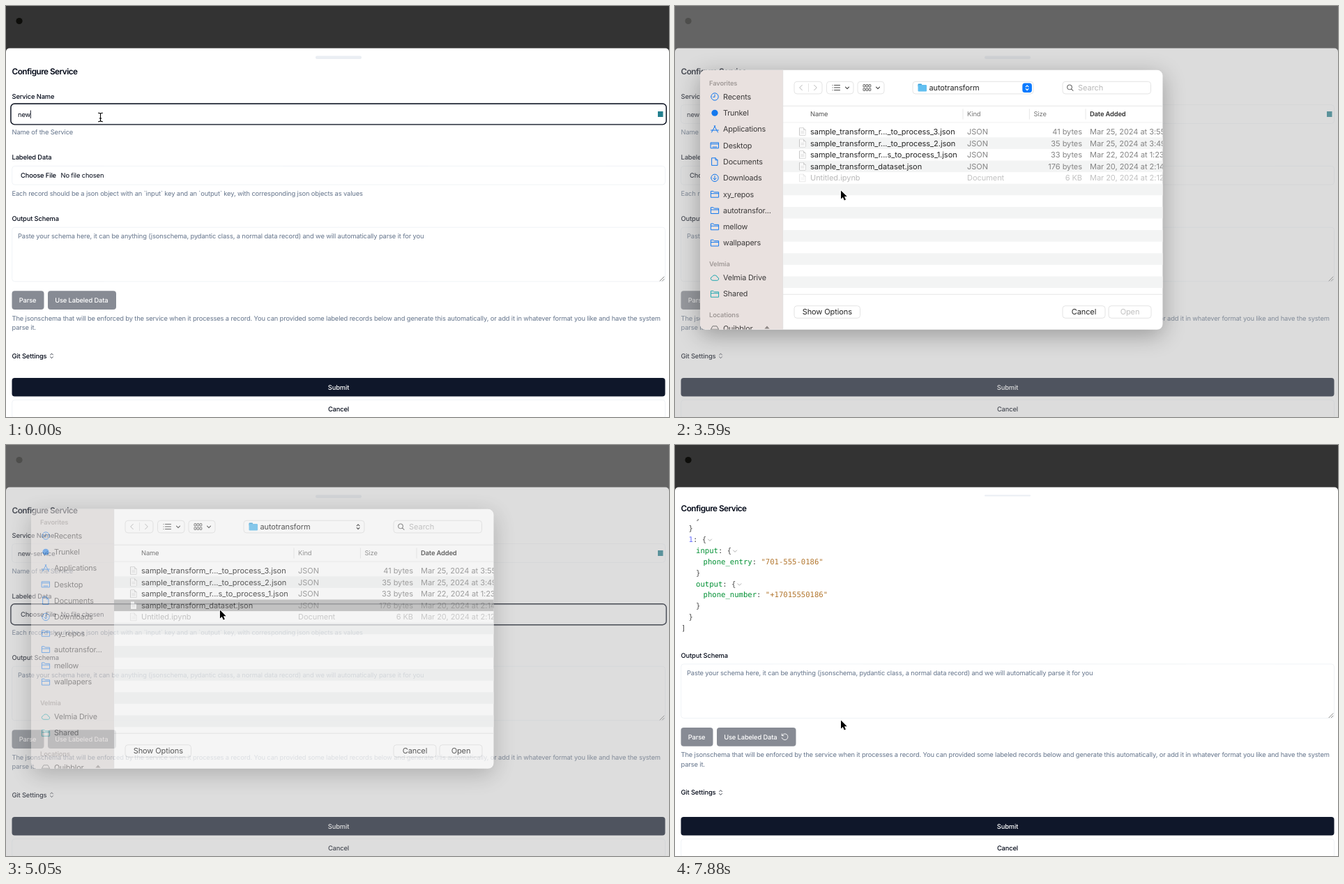
Animation of 951 by 589 pixels, one loop 8000 ms. Source, as an HTML page with a canvas:

```html
<!DOCTYPE html>
<html lang="en">
<head>
<meta charset="utf-8">
<title>Configure Service</title>
<style>
  html, body { margin: 0; width: 951px; height: 589px; overflow: hidden; background: #333; }
  canvas { display: block; width: 951px; height: 589px; }
</style>
</head>
<body>
<canvas id="stage"></canvas>
<script>
const W = 951, H = 589, LOOP = 8000;
const INK = '#020817', NAVY = '#0f172a', MUTED = '#64748b', BORDER = '#edf0f4', DISABLED = '#878b94';
const BLUE = '#1479ee', TEAL = '#20a8b0';
const ratio = window.devicePixelRatio || 1;

function layer(canvas) {
  canvas.width = W * ratio;
  canvas.height = H * ratio;
  const ctx = canvas.getContext('2d');
  ctx.scale(ratio, ratio);
  ctx.textRendering = 'geometricPrecision';
  return ctx;
}
const page = layer(document.getElementById('stage'));
const sheet = layer(document.createElement('canvas'));
let g = page;

const clamp = v => Math.max(0, Math.min(1, v));

// Piecewise linear track of [time, ...values]
function at(track, t) {
  const i = track.findIndex(p => p[0] > t);
  if (i === 0) return track[0].slice(1);
  if (i < 0) return track[track.length - 1].slice(1);
  const a = track[i - 1], b = track[i], u = (t - a[0]) / (b[0] - a[0]);
  return a.slice(1).map((v, k) => v + (b[k + 1] - v) * u);
}

// y is the middle of the capitals
function text(str, x, y, { color = INK, size = 9.34, weight = 400, align = 'left', gap = -0.13, font = 'Inter, sans-serif' } = {}) {
  g.font = `${weight} ${size}px ${font}`;
  g.letterSpacing = gap + 'px';
  g.textAlign = align;
  g.fillStyle = color;
  g.fillText(str, x, y + size * 0.36);
  return g.measureText(str).width;
}

function box(x, y, w, h, r, fill, stroke, lineWidth = 0.8) {
  g.beginPath();
  g.roundRect(x, y, w, h, r);
  if (fill) { g.fillStyle = fill; g.fill(); }
  if (stroke) { g.strokeStyle = stroke; g.lineWidth = lineWidth; g.stroke(); }
}

function icon(d, x, y, stroke, width = 1, fill) {
  g.save();
  g.translate(x, y);
  g.lineCap = g.lineJoin = 'round';
  const p = new Path2D(d);
  if (stroke) { g.strokeStyle = stroke; g.lineWidth = width; g.stroke(p); }
  if (fill) { g.fillStyle = fill; g.fill(p); }
  g.restore();
}

const ring = r => `M${-r} 0a${r} ${r} 0 1 0 ${2 * r} 0a${r} ${r} 0 1 0 ${-2 * r} 0`;
const ICONS = {
  clock: ring(5.2) + 'M0 -3V.4H-2.3',
  disc: ring(4.6),
  apps: 'M-4.5 4.5L.7 -5M4.5 4.5L-.7 -5M-5.5 1.5H5.5',
  desktop: 'M-5.5 -4h11v8h-11zM-5.5 -2h11M-3 2.2h6',
  page: 'M-4 -5.3H1L4 -2.3V5.3H-4zM1 -5.3V-2.3H4',
  download: ring(5.2) + 'M0 -2.8V2.6M-2.2 .5L0 2.7L2.2 .5',
  folder: 'M-5.6 4.2V-4.2h3.6l1.3 1.4h6.3V4.2zM-5.6 -.9h11.2',
  cloud: 'M-3.4 3.8a2.6 2.6 0 0 1-.3-5.1a4 4 0 0 1 7.5.8a2.2 2.2 0 0 1 .3 4.3z',
  drive: 'M-5.5 1L-3 -3.5H3L5.5 1V4h-11zM-5.5 1h11',
  down: 'M-2.5 -1.2L0 1.3L2.5 -1.2',
  upDown: 'M-1.9 -1.4L0 -3.3L1.9 -1.4M-1.9 1.4L0 3.3L1.9 1.4',
  copy: 'M-1.6 -4h4.2a1.2 1.2 0 0 1 1.2 1.2v2.6a1.2 1.2 0 0 1-1.2 1.2h-4.2a1.2 1.2 0 0 1-1.2-1.2v-2.6a1.2 1.2 0 0 1 1.2-1.2M-2.8 -1.4a1.2 1.2 0 0 0-1.2 1.2v3a1.2 1.2 0 0 0 1.2 1.2h3a1.2 1.2 0 0 0 1.2-1.2',
  redo: 'M-4.3 -4.4V-1.8H-1.7M-4.1 -2A4.4 4.4 0 1 1 -4.3 1.2',
  arrow: 'M0 0V12L2.8 9.5L4.8 14L6.9 13.1L4.9 8.7H8.7z',
  beam: 'M-3 -6.2Q0 -6.2 0 -4.5Q0 -6.2 3 -6.2M0 -4.5V4.5M-3 6.2Q0 6.2 0 4.5Q0 6.2 3 6.2M-1.4 1.5H1.4'
};

// ---- Form ----

const MONO = 10.6, CELL = MONO * 0.602, ROW = 15.93;
const tree = [[0, '', '[']];
[['202-555-0143', '+12025550143'], ['701-555-0186', '+17015550186']].forEach(([entry, number], i) => tree.push(
  [1, String(i), '{'],
  [2, 'input', '{'], [3, 'phone_entry', `"${entry}"`], [2, '', '}'],
  [2, 'output', '{'], [3, 'phone_number', `"${number}"`], [2, '', '}'],
  [1, '', '}']));
tree.push([0, '', ']']);

function drawTree(top, copies) {
  const mono = color => ({ color, size: MONO, gap: 0, font: '"DejaVu Sans Mono", monospace' });
  tree.forEach(([level, key, value], i) => {
    const y = top + i * ROW;
    let x = 9 + level * 10.5;
    if (key) {
      text(key, x, y, mono(level === 1 ? '#676dff' : '#009033'));
      text(':', x + key.length * CELL, y, mono('#4d4d4d'));
      x += (key.length + 2) * CELL;
    }
    text(value, x, y, mono(value[0] === '"' ? '#b2762e' : '#4d4d4d'));
    if (value === '{' || value === '[') {
      icon(ICONS.down, x + CELL + 5, y + 1.2, '#999', 0.8);
      if (i < copies) icon(ICONS.copy, x + CELL + 18.3, y + 0.8, '#555', 0.8);
    }
  });
}

function field(y, h, focused) {
  box(8.7, y, 936.8, h, 4, '#fff', BORDER);
  if (focused) box(6.9, y - 1.6, 940.3, h + 3.2, 5.5, null, INK, 1.4);
}

const label = (str, y) => text(str, 8.5, y, { weight: 500 });
const hint = (str, y, x = 8.5) => text(str, x, y, { color: MUTED });

function button(str, x, y, w, fill) {
  box(x, y, w, 26.8, 4, fill);
  text(str, x + 10.2, y + 13.6, { color: '#fff', weight: 500 });
}

function typedName(t) {
  const steps = [[0, 3], [150, 4], [450, 6], [600, 7], [1050, 8], [1350, 9], [1650, 11]];
  return 'new-service'.slice(0, steps.filter(s => s[0] <= t).pop()[1]);
}

function drawForm(t, tick) {
  const loaded = tick > 5300, loading = t >= 7280;
  const [scroll] = at([[5800, 0], [6401, 214.8], [6845, 326]], tick);
  const shift = loaded ? -2.4 : 0;

  g.fillStyle = '#333';
  g.fillRect(0, 0, W, H);
  icon(ICONS.disc, 19, 21.5, null, 1, '#0d0d0a');
  box(0, 60.5, W, 560, [5, 5, 0, 0], '#fff');
  box(444, 71.6, 66, loaded ? 2 : 4.4, 2, '#eaeef3');
  text('Configure Service', 8.5, 93.4 + shift, { size: 11.8, weight: 600, gap: -0.54 });

  g.save();
  g.beginPath();
  g.rect(0, 106, W, 416);
  g.clip();
  g.translate(0, shift - scroll);

  label('Service Name', 129.3);
  field(141.6, 26.7, t < 1950);
  const end = 17 + text(typedName(t), 17, 155.3);
  if (t < 1950) { g.fillStyle = INK; g.fillRect(end - 0.2, 149.5, 0.9, 11.5); }
  box(935, 151, 7.5, 8, 0, '#23808f');
  hint('Name of the Service', 180.6);

  label('Labeled Data', 217);
  field(229.4, 26.7, (t >= 1950 && t < 3140) || tick > 5000);
  text('Choose File', 21, 242.7, { weight: 500 });
  text(loaded ? 'sample_transform_dataset.json' : 'No file chosen', 78.5, 242.7);
  hint('Each record should be a json object with an `input` key and an `output` key, with corresponding json objects as values', 268.2);

  if (loaded) {
    box(8.5, 283.8, 53.5, 14.2, 7.1, NAVY);
    text('2 Records', 35.3, 290.8, { color: '#fff', size: 8.2, weight: 600, align: 'center' });
    drawTree(320, tick < 5900 ? 3 : tick < 6500 ? 1 : 0);
    g.translate(0, 325.1);
  }

  label('Output Schema', 304.6);
  box(8.7, 317.2, 936.8, 77.6, 4, '#fff', BORDER);
  hint('Paste your schema here, it can be anything (jsonschema, pydantic class, a normal data record) and we will automatically parse it for you', 329.6, 17);
  icon('M-3 3L3 -3M0.4 3L3 0.4', 941, 391, '#666', 0.8);

  button('Parse', 8.5, 408.2, 46, DISABLED);
  button('Use Labeled Data', 60, 408.2, loading ? 113.5 : 98, loaded && !loading ? NAVY : DISABLED);
  if (loading) {
    g.save();
    g.translate(157.6, 421.7);
    g.rotate((tick - 7880) / 1000 * 2 * Math.PI);
    icon(ICONS.redo, 0, 0, '#fff', 0.9);
    g.restore();
  }
  hint('The jsonschema that will be enforced by the service when it processes a record. You can provided some labeled records below and generate this automatically, or add it in whatever format you like and have the system', 447.2);
  hint('parse it.', 460.6);
  label('Git Settings', 501.4);
  icon(ICONS.upDown, 65.5, 501.4, INK, 0.8);
  g.restore();

  if (tick > 5900 && tick < 7100) box(948.8, 292 - (326 - scroll) * 0.555, 4, 229, 2, '#7d7d7d');

  box(8.5, 532.9, 937, 26.7, 4, NAVY);
  text('Submit', 477, 546.4, { color: '#fff', weight: 500, align: 'center' });
  box(8.7, 564.6, 936.8, 26.8, 4, '#fff', BORDER);
  text('Cancel', 477, 578, { weight: 500, align: 'center' });
}

// ---- File picker ----

const PICKER = { x: 36, y: 91.8, w: 663.5, h: 372, side: 119 };
const places = [
  ['clock', 'Recents'], ['disc', 'Trunkel'], ['apps', 'Applications'], ['desktop', 'Desktop'],
  ['page', 'Documents'], ['download', 'Downloads'], ['folder', 'xy_repos'],
  ['folder', 'autotransfor...'], ['folder', 'mellow'], ['folder', 'wallpapers']
];
const files = [
  ['sample_transform_r..._to_process_3.json', 'JSON', '41 bytes', 'Mar 25, 2024 at 3:55 PM'],
  ['sample_transform_r..._to_process_2.json', 'JSON', '35 bytes', 'Mar 25, 2024 at 3:49 PM'],
  ['sample_transform_r...s_to_process_1.json', 'JSON', '33 bytes', 'Mar 22, 2024 at 1:23 PM'],
  ['sample_transform_dataset.json', 'JSON', '176 bytes', 'Mar 20, 2024 at 2:14 PM'],
  ['Untitled.ipynb', 'Document', '6 KB', 'Mar 20, 2024 at 2:12 PM']
];

const ui = (str, x, y, color = '#262626', more) => text(str, x, y, { color, size: 11, gap: -0.04, ...more });

function place(kind, name, y, color) {
  icon(ICONS[kind], 57, y, kind === 'disc' ? null : color, 1, kind === 'disc' ? color : null);
  ui(name, 69, y, '#3c3a3a', { size: 10.8, gap: -0.15 });
}

function control(x, w, y = 108.3) {
  box(x, y, w, 17.6, 4, '#fff', '#dedede');
}

function rule(x, y, w, h) {
  g.fillStyle = '#e0e0e0';
  g.fillRect(x, y, w, h);
}

function drawPicker(selected, active) {
  const { x: left, y: top, w: width, h: height, side } = PICKER;
  g.clearRect(0, 0, W, H);
  g.save();
  g.shadowColor = 'rgba(0,0,0,.3)';
  g.shadowBlur = 32 * ratio;
  g.shadowOffsetY = 8 * ratio;
  box(left, top, width, height, 8, '#fff');
  g.restore();

  g.save();
  g.beginPath();
  g.roundRect(left, top, width, height, 8);
  g.clip();
  g.fillStyle = '#e9e1df';
  g.fillRect(left, top, side, height);
  rule(154.5, top, 0.7, height);

  const heading = (str, y) => text(str, 49, y, { color: '#a19a98', weight: 600 });
  heading('Favorites', 110.7);
  places.forEach(([kind, name], i) => place(kind, name, 130 + i * 23.27, BLUE));
  heading('Velmia', 370);
  place('cloud', 'Velmia Drive', 389.4, TEAL);
  place('folder', 'Shared', 412.6, TEAL);
  heading('Locations', 443);
  place('drive', 'Quibblor', 462.3, '#777');
  icon('M-3.6 .6L0 -3.4L3.6 .6zM-3.6 2h7.2v1h-7.2z', 132, 462, null, 1, '#8d8785');

  // Toolbar
  control(171, 40);
  rule(191, 111, 0.8, 12);
  icon('M1.8 -3.6L-1.8 0L1.8 3.6', 180.5, 117, '#b5b5b5');
  icon('M-1.8 -3.6L1.8 0L-1.8 3.6', 201.5, 117, '#b5b5b5');
  control(217.5, 38.5);
  icon('M-2.5 -3.5H5.5M-2.5 0H5.5M-2.5 3.5H5.5M-5 -3.5h.1M-5 0h.1M-5 3.5h.1', 231, 117, '#4a4a4a', 1.1);
  icon(ICONS.down, 247, 117.3, '#4a4a4a', 1.2);
  control(262, 38);
  for (let i = 0; i < 6; i++) box(270 + i % 3 * 4, 112.6 + (i > 2) * 5.4, 2.8, 3.4, 0.6, null, '#4a4a4a', 0.9);
  icon(ICONS.down, 291, 117.3, '#4a4a4a', 1.2);
  control(341, 173);
  box(348.5, 111.5, 5.5, 4, 1, '#3a9fd6');
  box(348.5, 113, 12.5, 9.5, 1.2, '#62bff0');
  ui('autotransform', 364.5, 117, '#262626', { gap: -0.1 });
  if (active) box(498.3, 110.4, 13.6, 13.6, 3.5, '#0a7aff');
  icon(ICONS.upDown, 505.1, 117.2, active ? '#fff' : '#333', 1.2);
  control(556, 126.5);
  icon(ring(3.4) + 'M2.5 2.5L5 5', 566, 116.4, '#6e6e6e', 1.1);
  ui('Search', 578, 117.2, '#b8b8b8');

  // Table
  rule(155, 142.8, 545, 0.8);
  rule(155, 166.7, 545, 0.5);
  [413, 508.3, 589].forEach(x => rule(x - 0.4, 147.5, 0.8, 15));
  const column = (str, x, weight, color) => text(str, x, 155, { color, size: 9.4, weight, gap: -0.15 });
  column('Name', 194, 400, '#555');
  column('Kind', 419, 400, '#777');
  column('Size', 514.5, 400, '#777');
  column('Date Added', 595, 600, '#333');

  for (let i = 0; i < 14; i++) {
    const y = 171.7 + i * 16.6, chosen = selected && i === 3;
    if (chosen || i % 2) {
      g.fillStyle = !chosen ? '#f3f4f4' : active ? '#0a64d8' : '#b8b8b8';
      g.fillRect(155, y, 545, 16.6);
    }
    if (!files[i]) continue;
    const [name, kind, size, date] = files[i], mid = y + 8.3;
    const off = i === 4, lit = chosen && active;
    const soft = lit ? '#fff' : off ? '#c2c2c2' : '#858585';
    g.globalAlpha = off ? 0.45 : 1;
    icon(ICONS.page, 183, mid, '#b4b4b4', 0.8, '#fafafa');
    icon('M-2 0H2M-2 2H2', 183, mid, '#ccc', 0.6);
    g.globalAlpha = 1;
    ui(name, 194, mid, lit ? '#fff' : off ? '#b9b9b9' : '#262626');
    ui(kind, 419, mid, soft);
    ui(size, 584, mid, soft, { align: 'right' });
    ui(date, 595, mid, soft);
  }

  // Footer
  rule(155, 412.8, 545, 0.8);
  [['Show Options', 171, 94.5], ['Cancel', 556, 61], ['Open', 622, 61]].forEach(([str, x, w]) => {
    control(x, w, 429.7);
    ui(str, x + w / 2, 438.4, str === 'Open' && !selected ? '#c0c0c0' : '#262626', { align: 'center', gap: -0.1 });
  });
  g.restore();
}

// The sidebar fades out ahead of the body and its shadow
function composePicker(tick) {
  const open = clamp((tick - 3000) / 440);
  const dim = open * clamp((5367 - tick) / 296);
  const close = clamp((5250 - tick) / 250);
  if (!dim) return;
  g.fillStyle = `rgba(171,171,171,${0.41 * dim})`;
  g.fillRect(0, 0, W, H);
  if (!open || !close) return;
  g = sheet;
  drawPicker(tick > 4850, tick < 5000);
  g = page;
  const { x, y, h, side } = PICKER;
  [[open * close ** 2.2, false], [open * close, true]].forEach(([alpha, outside]) => {
    g.save();
    g.beginPath();
    if (outside) g.rect(0, 0, W, H);
    g.rect(x, y, side, h);
    g.clip('evenodd');
    g.globalAlpha = alpha;
    g.drawImage(sheet.canvas, 0, 0, W, H);
    g.restore();
  });
}

// ---- Pointer ----

const pointerPath = [
  [2200, 134, 175], [2550, 115, 241.5], [3150, 115, 241.5], [3741, 279, 272], [4185, 285, 279],
  [4620, 307, 236.5], [5071, 307, 236.5], [5655, 190, 378.5], [6401, 190, 378.5],
  [6990, 115, 414], [7288, 115, 414], [7870, 238, 394.5]
];

function drawPointer(tick) {
  if (tick < 2230) {
    icon(ICONS.beam, 135.5, 159.5, '#fff', 2.4);
    icon(ICONS.beam, 135.5, 159.5, '#000', 1.1);
  } else {
    icon(ICONS.arrow, ...at(pointerPath, tick), '#fff', 1.6, '#000');
  }
}

// Scrolling, fades and pointer advance in ticks, as in a screen recording
const TICK = 147.8;

function render(now) {
  const t = now % LOOP;
  const tick = 3150 + Math.floor((t - 3125) / TICK) * TICK;
  drawForm(t, tick);
  composePicker(tick);
  drawPointer(tick);
  requestAnimationFrame(render);
}
requestAnimationFrame(render);
</script>
</body>
</html>
```
